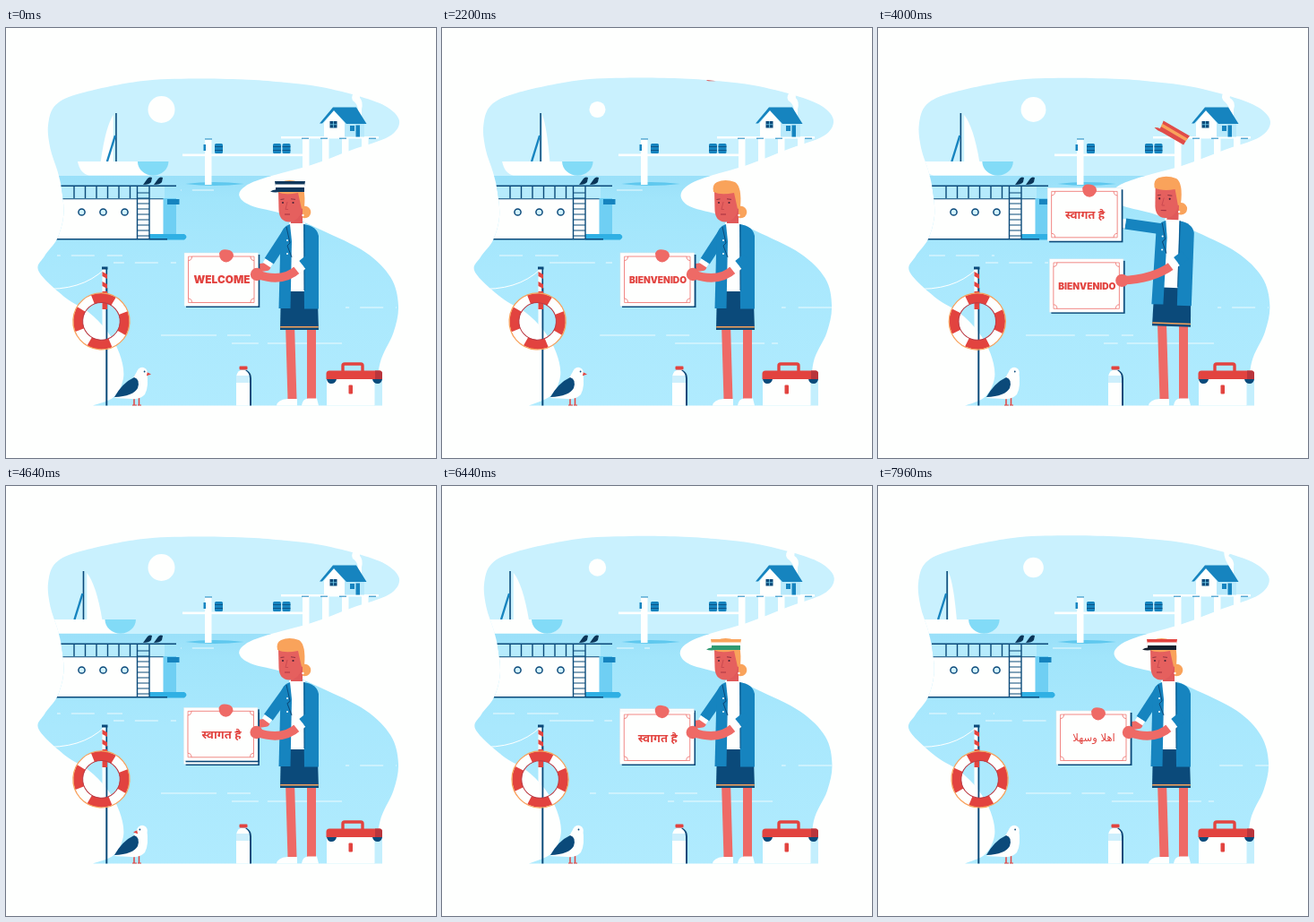
These frames come from a looping animation (480 by 480 pixels, 8000 ms). An HTML page:

```html
<!DOCTYPE html>
<html lang="en">
<head>
<meta charset="utf-8">
<title>Harbour welcome</title>
<style>
  html, body { margin: 0; width: 100%; height: 100%; overflow: hidden; background: #fefffe; }
  svg { display: block; width: 100vw; height: 100vh; }
</style>
</head>
<body>
<svg id="stage" viewBox="0 0 480 480" xmlns="http://www.w3.org/2000/svg"></svg>
<script>
const LOOP = 8000, CYCLE = 2700, SWAY = 2320;
const NAVY = '#0b4a7a', BLUE = '#1684bf', CYAN = '#2fb0e4', AQUA = '#82dbf7';
const SKIN = '#ee6a66', FACE = '#e5605e', RED = '#e2433f', HAIR = '#f9a35b', WHITE = '#fefffe';

const rect = (x, y, w, h, fill, extra = '') =>
  `<rect x="${x}" y="${y}" width="${w}" height="${h}" fill="${fill}" ${extra}/>`;
const disc = (x, y, r, fill, extra = '') =>
  `<circle cx="${x}" cy="${y}" r="${r}" fill="${fill}" ${extra}/>`;
const shape = (d, fill, extra = '') => `<path d="${d}" fill="${fill}" ${extra}/>`;
const line = (d, color, w, extra = '') =>
  `<path d="${d}" fill="none" stroke="${color}" stroke-width="${w}" ${extra}/>`;
const repeat = (xs, fn) => xs.map(fn).join('');

const greetings = [
  { text: 'WELCOME', size: 11.8, weight: 900, font: 'Inter, sans-serif', dy: 3.8 },
  { text: 'BIENVENIDO', size: 10.2, weight: 900, font: 'Inter, sans-serif', dy: 3.2 },
  { text: 'स्वागत है', size: 13, weight: 700, font: '"Noto Sans", "Noto Sans Devanagari", sans-serif', dy: 4 },
  { text: 'اهلا وسهلا', size: 11.6, weight: 400, font: '"DejaVu Sans", sans-serif', dy: 3.5 }
];
const hats = [ // crown, band, base
  ['#10385c', WHITE, '#10385c'],
  ['#e04c49', HAIR, '#e04c49'],
  [HAIR, WHITE, '#2f9a72'],
  [RED, WHITE, '#14202e']
];

function background() {
  return `<g clip-path="url(#inBay)">
    ${rect(0, 0, 480, 166, '#c9f1fe')}
    ${rect(0, 165, 480, 260, 'url(#sea)')}
    <circle id="sun" cx="173.5" cy="91" fill="${WHITE}"/>
    <g id="boat">
      <path id="sail" fill="${WHITE}"/>
      ${line('M0 95V149', NAVY, 1.6)}${line('M-1 120L-10 149', BLUE, 2.4)}
      ${shape('M-43 149H58A17 16 0 0 1 41 164.500H-30Q-40 163-43 149Z', WHITE)}
      ${shape('M24 149H58.500A17 15.500 0 0 1 24 149Z', AQUA)}
    </g>
    ${shape('M200 174Q232 170 266 174Q232 178 200 174Z', '#5fc8ee')}
    ${pier()}${ship()}
    <g id="waves" stroke="${WHITE}" stroke-width=".9" opacity=".9">
      ${repeat([[165, 285, 343], [252, 375, 352], [379, 436, 312], [57, 130, 254],
        [195, 232, 181], [120, 190, 262]],
        ([a, b, y]) => `<path d="M${a} ${y}H${b}"/>`)}
    </g>
    ${line('M38 291Q84 294 110 269', WHITE, 1)}
  </g>`;
}

function pier() {
  const barrel = x => rect(x, 129, 9, 11, BLUE, 'rx="1.5"') +
    line(`M${x} 132.500H${x + 9}M${x} 136.500H${x + 9}`, NAVY, .8);
  return rect(197, 140.5, 135, 2.6, WHITE) + rect(222, 124, 7.5, 51, WHITE) +
    rect(220.5, 130, 2.5, 7, BLUE) + rect(222, 123.5, 8, 1, BLUE) +
    repeat([233, 298, 308.5], barrel);
}

function ship() {
  return rect(55, 177, 122, 14, '#b6ebfc') +
    line('M60 176.300H190', NAVY, 1.5) +
    repeat([76, 88.5, 101, 113.5, 126, 138.5], x => line(`M${x} 177V190`, NAVY, 1.4)) +
    rect(50, 191, 126, 44, WHITE) + line('M50 190.800H182', NAVY, 1.1) +
    rect(175.5, 190, 14.5, 45, '#6fcff3') + rect(180, 191, 13.5, 6, BLUE) +
    repeat([84.5, 108.5, 132.5], x => disc(x, 205.5, 3.6, '#d2f3fe', `stroke="${NAVY}" stroke-width="1.5"`)) +
    `<path id="wake" fill="${CYAN}"/>` +
    line('M50 235.800H180', NAVY, 1.6) +
    line('M146.500 177V235M160 177V235', NAVY, 1.4) +
    repeat([...Array(9).keys()], i => line(`M146 ${184 + i * 6}H160`, NAVY, 1.2)) +
    repeat([153, 165], x => shape(`M${x} 175L${x + 5} 168Q${x + 7} 165.500 ${x + 10} 167L${x + 9} 172Q${x + 7} 175 ${x} 175Z`, '#0b3557'));
}

function house() {
  return `<path id="smoke" fill="${WHITE}"/>` +
    repeat([331, 353, 375, 397], x => rect(x, 123, 7.5, 38, WHITE)) +
    rect(307, 121, 109, 2.4, WHITE) +
    repeat([330, 351, 372, 405], x => line(`M${x} 123.200h8`, BLUE, 1)) +
    rect(393, 89, 4, 9, WHITE) +
    shape('M355 106L366 92L378 106V121.500H355Z', WHITE) +
    rect(378, 105, 22, 16.5, '#b8e9fb') +
    shape('M365 88.500H391L402.500 107H380L366 92L353 106.500H350Z', BLUE) +
    rect(361.5, 104, 8, 7.5, NAVY) + line('M365.500 104V111.500M361.500 107.700H369.500', AQUA, .7) +
    rect(384, 109, 5, 6, BLUE) + rect(390.5, 108.5, 4.5, 13, BLUE);
}

function post() {
  return line('M112.300 290V421.500', NAVY, 2) +
    rect(107.5, 268, 3.8, 80, WHITE) + line('M112.300 268V300', NAVY, 1.6) +
    shape('M107.500 272L113 275V280L107.500 277ZM107.500 283L113 286V291L107.500 288ZM107.500 294h5.500v20h-5.500Z', RED) +
    rect(107, 266.5, 6.5, 3, NAVY) +
    `<g id="ring">
      ${disc(110.2, 327.5, 26, 'none', `stroke="${RED}" stroke-width="10.5"`)}
      ${disc(110.2, 327.5, 26, 'none', `stroke="${WHITE}" stroke-width="10.5" stroke-dasharray="17 23.840" transform="rotate(26 110.200 327.500)"`)}
      ${disc(110.2, 327.5, 20.8, 'none', 'stroke="#b93a44" stroke-width="1"')}
      ${disc(110.2, 327.5, 31.6, 'none', `stroke="${HAIR}" stroke-width="1.2"`)}
    </g>`;
}

function gull() {
  return line('M143 410V421M148.500 410V421', RED, 1.5) + line('M141 421h5M147 421h4', RED, 1) +
    shape('M121 413Q140 396 147 382H157Q160 400 155 409Q150 415 140 414Z', WHITE) +
    shape('M121 412Q130 396 143 390Q150 392 147 402Q142 411 121 412Z', NAVY) +
    `<path id="beak" fill="${RED}"/>` + disc(152, 384.5, 5.7, WHITE) +
    `<circle id="eye" cy="383.500" r=".9" fill="${NAVY}"/>`;
}

function props() {
  return shape('M257 421.500V391Q257 384 262 382H269Q274 385 274 391V421.500Z', WHITE) +
    rect(257, 388, 15, 8, '#cdeffc') +
    shape('M269 382Q274 385 274 391V421.500H272V391Q272 385 267 382Z', NAVY) +
    rect(260.5, 377.5, 9, 4, RED, 'rx="1"') +
    rect(358, 391, 54, 30.5, WHITE) + rect(411.5, 391, 8.5, 30.5, '#c4effd') +
    line('M376 383V377Q376 375 378 375H396Q398 375 398 377V383', RED, 3.4) +
    shape('M357.500 392V386Q357.500 382.500 361 382.500H417Q420 382.500 420 386V392Z', RED) +
    shape('M412 382.500H417Q420 382.500 420 386V392H412Z', '#b9353c') +
    shape('M358 392H369Q368 397 363 397Q359 397 358 392ZM409 392H420Q419 397 415 397Q410 397 409 392Z', NAVY) +
    rect(382.5, 398.5, 4.5, 10, RED, 'rx="1"');
}

function woman() {
  return line('M317 330L319.500 415', SKIN, 10) + line('M341 330V415', SKIN, 10) +
    shape('M302 421.500Q303 415 314 414H325V421.500ZM330 421.500Q331 414 337 413.500H347L349 421.500Z', WHITE) +
    `<g id="arm"></g>
    <g id="body">
      ${shape('M307 290H347.500L349 337H306Z', NAVY)}
      ${line('M306.200 333.800H348.800', HAIR, 1.6)}
      ${rect(316, 217, 18, 77, WHITE)}
      ${shape('M317 219Q307 222 306.500 234L304.500 313H317.500L319 238Z', BLUE)}
      ${shape('M332 219Q347 221 349 232V313.500H333Z', BLUE)}
      ${line('M313 222L317 240L314 243L319 256', NAVY, 1)}${line('M333 219V293', NAVY, .8)}
      ${disc(314, 237, 1, WHITE)}${disc(314, 252, 1, WHITE)}
      ${disc(333.5, 205.5, 6.8, HAIR)}
      ${shape('M318 197H331V218H318Z', '#e0595a')}
      ${shape('M304 182H330V203Q327 216 316 216.500Q305 216 304.500 203Z', FACE)}
      ${shape('M303 183Q301 175 307 172Q316 168 327 172Q335 177 333 200L330 202Q328 193 326 184Q311 187 303 183Z', HAIR)}
      ${line('M306.500 191.500l4-.6M318 190.800l5 .6', '#8e3442', 1)}
      ${disc(309, 195, 1.1, '#4b2337')}${disc(320.5, 195, 1.1, '#4b2337')}
      ${line('M314 194L312 202.500H315', '#c8484f', .9)}${line('M311 208H317', '#a93443', 1.1)}
      ${disc(331.5, 209, 1.2, WHITE)}
    </g>
    <g clip-path="url(#inHat)"><g id="hat">
      <path d="M-18-7H16L15-1H-17Z"/>
      <path d="M-17.500-3.500H15.500L15 .500H-17Z"/>
      <path d="M-17 0H15V5H-12Q-19 6-23 4.500Q-20 2.500-17 2.500Z"/>
    </g></g>
    <g id="cards"></g><g id="hands"></g>`;
}

const card = id => `<g id="${id}">
  ${rect(-40, -28.5, 82.3, 59, NAVY)}${rect(-42, -30.5, 82.5, 59.3, WHITE, 'stroke="#d5e4ec" stroke-width=".4"')}
  ${line('M-33.500-26.500H32Q32-22 36-22V20.500Q32 20.500 32 25H-33.500Q-33.500 20.500-37.500 20.500V-22Q-33.500-22-33.500-26.500Z', SKIN, .8)}
  ${repeat([[-1, -1], [1, -1], [-1, 1], [1, 1]], ([x, y]) =>
    line(`M${x * 36.7 - .7} ${y * 21.3 - .7}V${y * 25.7 - .7}H${x * 32.7 - .7}`, SKIN, .7))}
  <text text-anchor="middle" fill="${RED}"></text></g>`;

const stage = document.getElementById('stage');
stage.innerHTML = `<defs>
    <linearGradient id="sea" x1="0" y1="0" x2="0" y2="1">
      <stop offset="0" stop-color="#9ae0f9"/><stop offset=".1" stop-color="#a1e5fb"/>
      <stop offset=".4" stop-color="#a9e8fd"/><stop offset="1" stop-color="#b0ebfe"/>
    </linearGradient>
    <clipPath id="inBay"><path id="bay"/></clipPath>
    <clipPath id="inHat"><path id="bayHat"/><rect y="110" width="480" height="370"/></clipPath>
  </defs>` + background() + house() + post() + gull() + props() + woman();
const $ = id => document.getElementById(id);
$('cards').innerHTML = card('oldCard') + card('newCard');

const { sin, cos, PI } = Math;
const clamp = (v, a = 0, b = 1) => Math.min(b, Math.max(a, v));
const ramp = (t, a, b) => clamp((t - a) / (b - a));
const smooth = x => (1 - cos(PI * x)) / 2;
const set = (id, k, v) => $(id).setAttribute(k, v);

const shore = [
  [97, 421.5], [121, 411], [131.5, 389], [127, 363], [113, 338], [92, 317], [66, 301],
  [36.5, 272], [43, 255], [57, 236], [64, 210], [62, 182], [57, 160], [49, 135],
  [46.5, 109], [55, 86], [84, 72.5], [150, 59], [210, 56], [270, 57], [310, 60],
  [350, 65], [395, 76], [425, 88], [438, 104], [426, 121], [385, 136], [340, 153],
  [290, 167], [266, 177], [259, 188], [272, 199], [310, 209], [350, 226],
  [400, 251], [428, 279], [436.5, 310], [431, 340], [416, 374], [412, 421.5]
];

// Smooth curve through the shore points, each drifting a little.
function bayPath(a) {
  const last = shore.length - 1;
  const pts = shore.map(([x, y], i) => {
    if (i === 0 || i === last) return [x, y];
    const tip = Math.exp(-(((i - 30) / 2) ** 2)) * 4 * (1 - cos(a));
    const w = tip > .01 ? .2 : 1.5;
    return [x + w * sin(a + (i - 7) * .05) + tip, y + .8 * cos(a + i * .3)];
  });
  let d = `M${pts[0]}`;
  for (let i = 0; i < last; i++) {
    const p = pts[Math.max(0, i - 1)], q = pts[i], r = pts[i + 1], s = pts[Math.min(last, i + 2)];
    d += `C${q[0] + (r[0] - p[0]) / 6} ${q[1] + (r[1] - p[1]) / 6} ` +
      `${r[0] - (s[0] - q[0]) / 6} ${r[1] - (s[1] - q[1]) / 6} ${r}`;
  }
  return d + 'Z';
}

function scenery(t) {
  const a = PI * t / SWAY;
  const bay = bayPath(a);
  set('bay', 'd', bay);
  set('bayHat', 'd', bay);
  set('sun', 'r', 12 + 3 * cos(a));

  const x = 99.3 - 24 * cos(PI * (t - 7030) / 7450);
  const s = clamp(28 * sin(PI * (t - 1400) / 7400), -19, 19);
  set('boat', 'transform', `translate(${x} 0)`);
  set('sail', 'd', `M${s * .2} 97Q${s * .75} 110 ${s * 1.1} 149H${s * .2}Z`);

  const w = 200 + 2 * cos(a * 2);
  set('wake', 'd', `M160 236.500V230H${w - 3}Q${w + 2} 233 ${w - 3} 236.500Z`);
  [...$('waves').children].forEach((el, i) => {
    el.setAttribute('stroke-dasharray', i === 1 ? '100 8 30 10' : '62 12 26 14');
    el.setAttribute('stroke-dashoffset', -8 - i * 15 - 20 * sin(a + i));
  });

  const k = 3 * sin(a * 2), m = 2 * cos(a * 2);
  set('smoke', 'd', `M393 91Q${390 + m} 84 ${387 + k * .5} 81Q${384 + k} 75 ${389 + m} 70` +
    `Q${396 + k * .4} 72 ${393 + m} 78Q${399 - k * .4} 82 397 91Z`);

  // Pendulum swing from the top of the post
  set('ring', 'transform', `rotate(${3.75 * cos(2 * a)} 110.200 270)`);

  const turn = 1 - 2 * smooth(ramp(t, 3900, 4150)) + 2 * smooth(ramp(t, 6300, 6550)) -
    smooth(ramp(t, 7700, 8000)) * .6;
  const b = 152 + turn * 5;
  set('beak', 'd', `M${b} 384L${b + turn * 5} 386.500L${b} 388.300Z`);
  set('eye', 'cx', 152 + turn * 2.6);
}

function fillCard(id, n, x, y) {
  const g = $(id), el = g.querySelector('text'), c = greetings[n % greetings.length];
  g.setAttribute('transform', `translate(${x} ${y})`);
  if (el.textContent === c.text) return;
  el.textContent = c.text;
  el.setAttribute('font-size', c.size);
  el.setAttribute('font-weight', c.weight);
  el.setAttribute('font-family', c.font);
  el.setAttribute('y', c.dy);
}

function hat(n, p, lean) {
  const next = p >= 1700;
  hats[(next ? n + 1 : n) % hats.length].forEach((c, i) => $('hat').children[i].setAttribute('fill', c));
  let [x, y] = lean(318, 178), rot = 0;
  if (next) {
    const f = ramp(p, 2050, 2330);
    y -= 175 * (1 - f * f);
    if (p > 2330) y -= 5 * sin(PI * ramp(p, 2330, 2480));
  } else if (p > 1150) {
    const q = (p - 1150) / 250;
    x = 321 + 16 * q;
    y = 176 - 95 * q;
    rot = 50 * q;
  }
  set('hat', 'transform', `translate(${x} ${y}) rotate(${rot})`);
}

function performer(t) {
  const n = Math.floor(t / CYCLE), p = t % CYCLE;
  const u = p < 1380 ? smooth(ramp(p, 1000, 1380)) : 1 - smooth(ramp(p, 1380, 2030));
  const v = u * u, tilt = 2.6 * v, ang = tilt * PI / 180;
  const lean = (x, y) => [
    328 + (x - 328) * cos(ang) - (y - 337) * sin(ang),
    337 + (x - 328) * sin(ang) + (y - 337) * cos(ang) - 5 * v
  ];
  set('body', 'transform', `translate(0 ${-5 * v}) rotate(${tilt} 328 337)`);

  const nx = 241 - 11 * u, ny = 281.5 - 81 * u;
  const ox = 241 - 8.5 * u, oy = 281.5 + 8.5 * v;
  fillCard('oldCard', n, ox, oy);
  fillCard('newCard', n + 1, nx, ny);
  $('newCard').style.display = p < 1000 ? 'none' : '';
  $('cards').append($(p < 1380 ? 'oldCard' : 'newCard'));

  // Arm reaching behind the raised card
  const [sx, sy] = lean(314, 229);
  const wx = nx + 50 - 11 * u, wy = ny - 17 + 26 * clamp(u * 1.2);
  const dx = sx - wx, dy = sy - wy, len = Math.hypot(dx, dy);
  const cx = wx + dx / len * 5, cy = wy + dy / len * 5;
  $('arm').innerHTML =
    line(`M${nx + 22} ${wy + 6}L${wx} ${wy + 2}`, SKIN, 9, 'stroke-linecap="round"') +
    line(`M${sx} ${sy}L${cx} ${cy}`, BLUE, 12) +
    line(`M${cx} ${cy}L${wx} ${wy}`, WHITE, 10);

  // Thumb on top, other hand at the card's right edge
  const hx = ox + 39, hy = oy - 6.5;
  const [ex, ey] = lean(326, 269), [kx, ky] = lean(340, 257), [fx, fy] = lean(331, 264.5);
  $('hands').innerHTML =
    shape(`M${nx - 3} ${ny - 30}Q${nx - 1} ${ny - 35.5} ${nx + 6} ${ny - 34}Q${nx + 13} ${ny - 33} ${nx + 13} ${ny - 27}` +
      `Q${nx + 11} ${ny - 21} ${nx + 5} ${ny - 20}Q${nx - 3} ${ny - 21} ${nx - 3} ${ny - 30}Z`, SKIN) +
    line(`M${ex} ${ey}Q${(ex + hx) / 2 + 6} ${(ey + hy) / 2 + 13 - 7 * v} ${hx} ${hy}`, SKIN, 9.5) +
    disc(hx, hy, 7.2, SKIN) +
    line(`M${ex - 2} ${ey + 1}L${fx} ${fy}`, WHITE, 11) +
    line(`M${fx} ${fy}L${kx} ${ky}`, BLUE, 11.5);
  hat(n, p, lean);
}

function frame(now) {
  const t = now % LOOP;
  scenery(t);
  performer(t);
  requestAnimationFrame(() => frame(performance.now() - start));
}
const start = performance.now();
frame(0);
</script>
</body>
</html>
```
